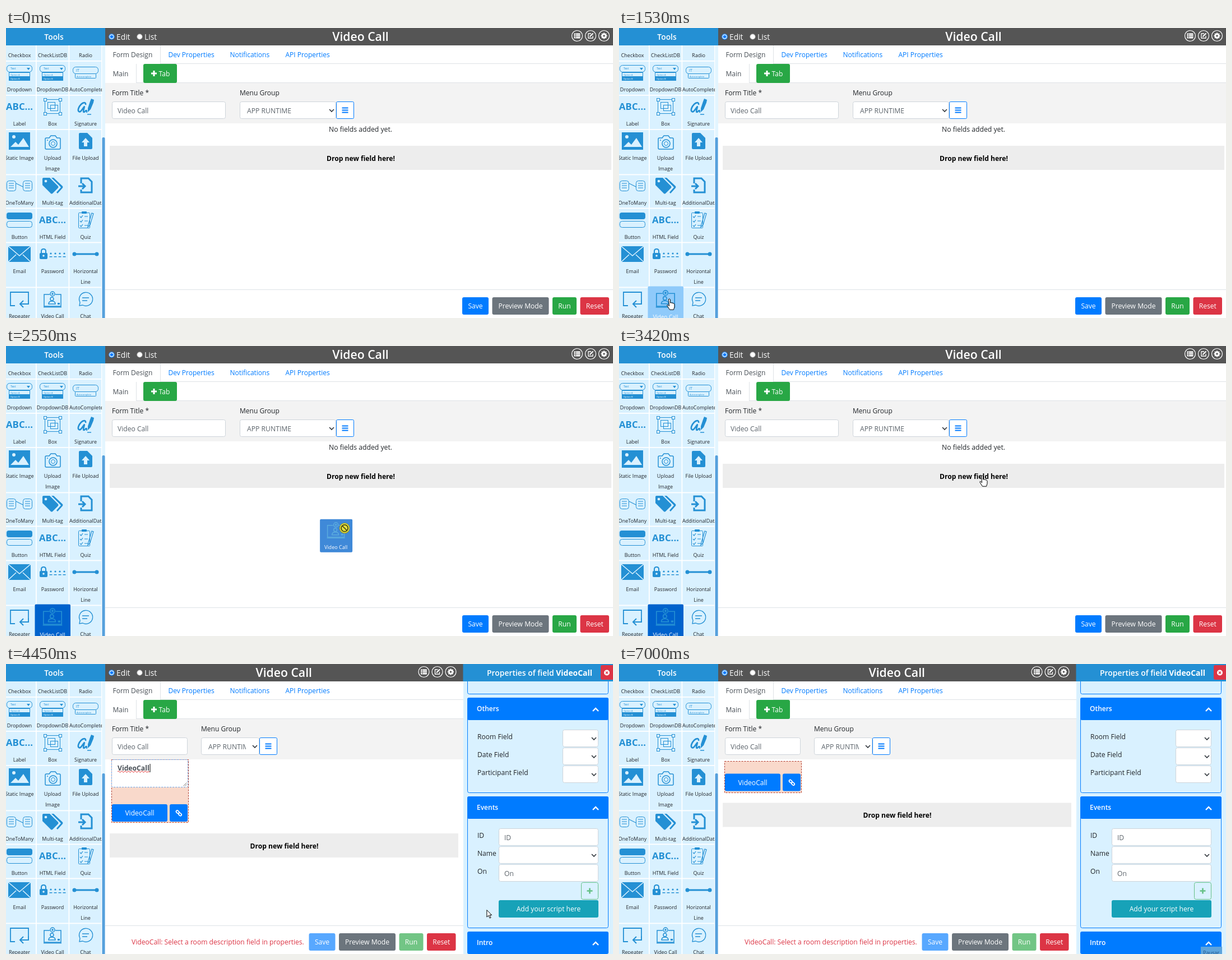
Write an HTML page that moves like this. It is 1083 px wide and 517 px high and loops after 7080 ms.

```html
<!DOCTYPE html>
<html lang="en">
<head>
<meta charset="utf-8">
<title>Form designer</title>
<style>
html, body { margin: 0; width: 100%; height: 100%; overflow: hidden; background: #fff; }
#stage { display: block; width: 100vw; height: 100vh; font-family: "Open Sans", "Noto Sans", sans-serif; }
</style>
</head>
<body>
<svg id="stage" viewBox="0 0 1083 517"></svg>
<script>
const BLUE = '#2490d4', PALE = '#d9f1ff', LINK = '#007bff', INK = '#212529', GREY = '#495057', SOFT = '#5c646b', EDGE = '#ced4da', RULE = '#dee2e6';

// Drawing helpers, each returning SVG markup
const text = (x, y, s, fill = INK, size = 12.1, anchor = 'start', weight = 400) =>
  `<text x="${x}" y="${y}" fill="${fill}" font-size="${size}" text-anchor="${anchor}" font-weight="${weight}">${s}</text>`;
const mid = (x, y, s, fill, size, weight) => text(x, y, s, fill, size, 'middle', weight);
const rect = (x, y, w, h, fill, r = 0, stroke = '', extra = '') => stroke
  ? `<rect x="${x + .5}" y="${y + .5}" width="${w - 1}" height="${h - 1}" rx="${r}" fill="${fill}" stroke="${stroke}" ${extra}/>`
  : `<rect x="${x}" y="${y}" width="${w}" height="${h}" rx="${r}" fill="${fill}" ${extra}/>`;
const fill = (d, c = BLUE) => `<path d="${d}" fill="${c}"/>`;
const line = (d, c = BLUE, w = 1.5) => `<path d="${d}" fill="none" stroke="${c}" stroke-width="${w}"/>`;
const dot = (x, y, r, c = BLUE) => `<circle cx="${x}" cy="${y}" r="${r}" fill="${c}"/>`;
const ring = (x, y, r, c = BLUE, w = 1.5) => `<circle cx="${x}" cy="${y}" r="${r}" fill="none" stroke="${c}" stroke-width="${w}"/>`;
const at = (x, y, s, k = 1) => `<g transform="translate(${x} ${y}) scale(${k})">${s}</g>`;
const group = (id, s) => `<g id="${id}">${s}</g>`;
const clip = (x, y, w, h, s) => `<svg x="${x}" y="${y}" width="${w}" height="${h}" viewBox="${x} ${y} ${w} ${h}">${s}</svg>`;

const button = (x, y, w, s, c, alpha = 1) =>
  `<g opacity="${alpha}">${rect(x, y, w, 31, c, 3)}${mid(x + w / 2, y + 20, s, '#fff')}</g>`;
const input = (x, y, w, s) => rect(x, y, w, 31, '#fff', 3, EDGE) + text(x + 10, y + 21, s, SOFT);
const select = (x, y, w, s = '') => rect(x, y, w, 31, '#fff', 3, EDGE) +
  clip(x + 1, y + 1, w - 25, 29, text(x + 13, y + 21, s, SOFT, 12.2)) +
  line(`M${x + w - 12} ${y + 14}l4 4 4-4`, '#343a40', 1.7);

// Tool icons, drawn around their own centre
const listIcon = rect(-23, -13, 46, 13, 'none', 5, BLUE) + text(-16, -5, 'Text', BLUE, 5) + fill('M13-8h6l-3 4z') +
  rect(-19, 0, 38, 8, 'none', 0, BLUE) + text(-16, 5.5, 'Option A', BLUE, 4) +
  rect(-19, 7, 38, 8, BLUE) + text(-16, 12.5, 'Option B', '#fff', 4);
const abc = mid(0, 6, 'ABC...', BLUE, 16.8, 700);
const boxHandles = [[-16, -15], [11, -15], [-16, 10], [11, 10]].map(([x, y]) => rect(x, y, 6, 6, PALE, 0, BLUE)).join('');
const card = x => rect(x, -9, 17, 19, 'none', 4, BLUE) + line(`M${x + 4}-4h9m-9 4h9m-9 4h9`, BLUE, 1);
const callIcon = line('M-5-9h-10v21h30v-21h-10') + ring(0, -10, 4) + dot(0, -10, 1.8) +
  ring(-1, -1, 3) + line('M-7 8q0-5 6-5t6 5z') + rect(9, 6, 4, 3, BLUE) + line('M-16 13.5h32');

const tools = [
  [48, 0, ['Checkbox'], '', ['CheckListDB'], '', ['Radio'], ''],
  [109, 79, ['Dropdown'], listIcon, ['DropdownDB'], listIcon, ['AutoComplete'],
    rect(-23, -10, 46, 13, 'none', 5, BLUE) + text(-17, -1, 'IT', BLUE, 7) + rect(-19, 2, 38, 9, 'none', 1, BLUE) + text(-16, 8.5, 'Autocomplete', BLUE, 4)],
  [170, 140, ['Label'], abc, ['Box'],
    rect(-14, -13, 28, 26, 'none', 0, BLUE) + boxHandles + rect(-9, -8, 14, 12, 'none', 0, BLUE) + rect(-4, -3, 14, 11, 'none', 0, BLUE),
    ['Signature'],
    line('M0-3c1-5-4-5-8-1s-7 11-4 13 6-4 9-8-3 9 0 9 2-3 4-3 0 3 2 3', BLUE, 2.6) + fill('M10-14l5 2-1 5-5 12-5 5 0-7 4-12z') + line('M3 14h7', BLUE, 1.5)],
  [231, 202, ['Static Image'], rect(-19, -16, 38, 31, BLUE) + dot(-10, -8, 3, PALE) + fill('M-16 10l9-9 5 5 9-12 10 16z', PALE),
    ['Upload', 'Image'], line('M-13-4q0-2 2-2h5l3-4h8l3 4h4q2 0 2 2v16q0 2-2 2h-23q-2 0-2-2z') + ring(1, 4, 7) + ring(1, 4, 3.5, BLUE, 1) + dot(-9, -2, 1),
    ['File Upload'], fill('M-10-15h13l9 9v18q0 2-2 2h-20q-2 0-2-2v-25q0-2 2-2z') + fill('M0-6l7 8h-4v7h-6v-7h-4z', PALE)],
  [311, 281, ['OneToMany'], card(-23) + card(6) + line('M-6-4l12 6', BLUE, 1.2),
    ['Multi-tag'], fill('M-2-14h4l16 15q1 2 0 3l-9 10-2-2 8-9z') + fill('M-18-12q0-2 2-2h11l15 15q1 2 0 3l-10 10q-2 1-3 0l-15-15z') + dot(-12, -8, 2.3, PALE),
    ['AdditionalData'], line('M-8-4v-9h13l6 6v19h-19v-5', BLUE, 3) + line('M-13 1h12m-5-5l5 5-5 5', BLUE, 3)],
  [372, 342, ['Button'], rect(-23, -13, 46, 12, BLUE, 4) + rect(-23, 2, 46, 12, 'none', 4, BLUE),
    ['HTML Field'], abc, ['Quiz'],
    rect(-13, -13, 21, 28, 'none', 1, BLUE) + rect(-7, -15, 9, 4, BLUE, 1) +
    [-6, 2, 10].map(y => line(`M-10 ${y}l2 2 3-4m3 2h6`, BLUE, 1.2)).join('') + line('M11-12l-6 20-1 5 4-4 6-20z', BLUE, 1.2)],
  [433, 403, ['Email'], rect(-20, -14, 40, 28, BLUE) + line('M-20-14l20 17 20-17M-20 14l14-13M20 14l-14-13', PALE, 1.6),
    ['Password'], rect(-23, -2, 14, 11, BLUE, 2) + line('M-20-2v-3q0-4 4-4t4 4v3', BLUE, 2) + dot(-16, 3, 1.8, PALE) +
    [-3, 5, 13, 21].map(x => dot(x, -1, 1.6) + rect(x - 2.5, 4, 5, 1.5, BLUE)).join(''),
    ['Horizontal', 'Line'], line('M-20 0h40', BLUE, 3) + dot(-20, 0, 3.5) + dot(20, 0, 3.5)],
  [513, 484, ['Repeater'], line('M-8 11h-8v-24h32v14', BLUE, 1.8) + line('M16 1v7h-15m6-6l-6 6 6 6', BLUE, 2),
    ['Video Call'], callIcon, ['Chat'],
    line('M-11 11l1-6a12 12 0 1 1 5 5z', BLUE, 1.4) + line('M-6-3h12m-12 5h9', BLUE, 1.4)]
];

function sidebar() {
  let s = rect(0, 30, 177, 487, PALE);
  for (const y of [58, 119, 180, 260.5, 320.5, 381.5, 461.5]) s += rect(0, y, 171, 1.8, '#fff');
  for (const x of [53, 111.5, 170]) s += rect(x, 30, 1.8, 487, '#fff');
  for (const [labelY, iconY, ...cells] of tools)
    for (let i = 0; i < 3; i++) {
      const x = 24 + 59 * i;
      s += at(x, iconY, cells[2 * i + 1]);
      cells[2 * i].forEach((word, n) => {
        const y = labelY + 3.5 + 19.3 * n, wide = i === 2 && word.length > 11;
        s += wide ? text(113, y, word, INK, 9) : mid(x, y, word, INK, 9);
      });
    }
  return clip(0, 30, 171.5, 487, s) + rect(171.5, 30, 5.5, 487, '#e3f5ff') + rect(171.5, 195, 5, 324, '#56a0dc', 2) +
    rect(0, 0, 177, 31, BLUE) + mid(85.5, 20.5, 'Tools', '#fff', 13.8, 600);
}

// Main area; "cut" is the width taken by the properties panel
function main(cut) {
  const r = x => x - cut, alpha = cut ? .65 : 1;
  const col = (x, n) => Math.floor(x - cut * n / 4);
  const sx = col(417, 1), bx = col(589, 2);
  const badge = (x, s) => at(r(x), 14, ring(0, 0, 9.5, '#fff', 1.2) + s);
  const gear = [0, 45, 90, 135].map(a => `<path d="M-5.5 0h11" stroke="#fff" stroke-width="2.4" transform="rotate(${a})"/>`).join('');
  return rect(177, 0, 906, 517, '#fff') + rect(177, 0, 906, 31, '#555') +
    dot(188.5, 15.5, 5, '#fff') + ring(188.5, 15.5, 4.6, LINK, 1.2) + dot(188.5, 15.5, 2.8, LINK) + text(197, 20.5, 'Edit', '#fff', 13.8) +
    dot(238.5, 15.5, 5, '#fff') + ring(238.5, 15.5, 4.8, '#767676', .8) + text(247, 20.5, 'List', '#fff', 13.8) +
    mid(632.5 - cut / 2, 23, 'Video Call', '#fff', 21.2, 600) +
    badge(1019, rect(-5.5, -4.5, 11, 9, '#fff', 1) + line('M-2.5-4.5v9M-5.5-1.5h11m-11 3h11', '#555', .8)) +
    badge(1043, line('M1-4h-5v8h8v-4', '#fff', 1.3) + line('M-1.5 1.5l6-6', '#fff', 2.2)) +
    badge(1067, gear + dot(0, 0, 4.2, '#fff') + dot(0, 0, 1.7, '#555')) +
    rect(177, 63, 906, 1, RULE) + rect(177, 63, 98, 1, '#fff') + rect(275, 31, 1, 33, RULE) +
    text(190.5, 52, 'Form Design', GREY, 12) + text(289.5, 52, 'Dev Properties', LINK, 12) +
    text(399.5, 52, 'Notifications', LINK, 12) + text(498.5, 52, 'API Properties', LINK, 12) +
    rect(177, 97, 906, 1, RULE) + rect(177, 97, 55, 1, '#fff') + rect(232, 64, 1, 34, RULE) + text(190.5, 86, 'Main', GREY, 12) +
    rect(245, 64, 60, 34, '#28a745', 3) + line('M259 81h10m-5-5v10', '#fff', 3) + text(272.5, 86, 'Tab', '#fff') +
    rect(177, 98, 906, 72, '#f3f3f3') +
    text(189, 120, 'Form Title *', INK, 12) + input(189, 131, col(203.5, 1), 'Video Call') +
    text(sx, 120, 'Menu Group', INK, 12) + select(sx, 131, bx - sx, 'APP RUNTIME') +
    rect(bx, 131, 32, 31, '#fff', 2, LINK) + line(`M${bx + 10.5} 142.5h11m-11 4h11m-11 4h11`, LINK, 1.8) +
    rect(177, 466, 906, 1, RULE) +
    button(r(814), 480, 47, 'Save', LINK, alpha) + button(r(867.5), 480, 101, 'Preview Mode', '#6c757d') +
    button(r(975), 480, 43, 'Run', '#28a745', alpha) + button(r(1024.5), 480, 51.5, 'Reset', '#dc3545');
}

const dropBar = (y, w) => rect(185, y, w, 43, '#ededed') + mid(185.5 + w / 2, y + 26.5, 'Drop new field here!', '#000', 12.1, 700);

function panel() {
  const head = (y, s) => rect(823, y, 252, 40, LINK, 3) + text(840, y + 23.5, s, '#fff', 12, 'start', 600) + line(`M1047 ${y + 24}l5-5 5 5`, '#fff', 2.4);
  const body = (y, h) => rect(823, y, 252, h, PALE, 3, LINK);
  let s = rect(816, 0, 267, 517, PALE) + rect(815.5, 0, 267.5, 31, BLUE) +
    mid(952, 20.5, 'Properties of field <tspan font-weight="700">VideoCall</tspan>', '#fff', 13.9, 600) +
    rect(1061, 2, 24, 26, '#dc3545', 3) + dot(1072, 15.5, 5, '#fff') + line('M1070 13.5l4 4m0-4l-4 4', '#dc3545', 1.4) +
    clip(816, 31, 267, 30, body(10, 44)) +
    body(60, 170) + head(60, 'Others') + body(236, 235) + head(236, 'Events') + head(477, 'Intro');
  ['Room Field', 'Date Field', 'Participant Field'].forEach((w, i) => s += text(841, 134 + 32 * i, w) + select(993, 117 + 32 * i, 64));
  ['ID', 'Name', 'On'].forEach((w, i) => s += text(841, 309.5 + 32 * i, w) +
    (i === 1 ? select(879, 325, 178) : input(879, 293 + 32 * i, 178, w)));
  return s + `<g opacity=".65">${rect(1026, 389, 31, 31, 'none', 3, '#28a745')}${line('M1036.5 404.5h10m-5-5v10', '#28a745', 2.6)}</g>` +
    button(879, 421, 178, 'Add your script here', '#17a2b8');
}

const frame = (y, h) => rect(188, y, 138, h, '#f9d9cb', 0, '#b0392b', 'stroke-dasharray="3 2"');
const chain = at(308, 265.5, `<g transform="rotate(45)">${[-6, 0].map(x => rect(x, -2.5, 7, 5, 'none', 2.2, '#fff', 'stroke-width="1.7"')).join('')}</g>`);
const wave = 'M199 192' + 'q1.5-2.5 3 0t3 0'.repeat(9) + 'h3';
const editor = frame(170, 113) + rect(188, 170, 137, 50, '#fff', 2, '#6fa8e8', 'stroke-dasharray="3 2"') +
  text(199, 190, 'VideoCall', GREY, 12.2, 'start', 700) + line(wave, '#e03030', 1) + rect(256.5, 178, 1, 15, '#000') +
  line('M316.5 217.5l6-6m-3 6l3-3', '#777', 1);
const fieldButtons = rect(189, 250, 99, 31, LINK, 3) + mid(238.5, 270, 'VideoCall', '#fff') + rect(292, 250, 32, 31, LINK, 3) + chain + dropBar(302, 622);

const liveTile = c => rect(51.5, 460.5, 63.5, 58, c, 2) + at(83, 483, callIcon, 1.08) + mid(83, 519, 'Video Call', '#fff', 9.9);
const ghost = `<g opacity=".75">${rect(0, 0, 58, 59, '#0062cc', 2)}${at(28.5, 20, callIcon)}${mid(28.5, 53, 'Video Call', '#fff', 9)}</g>`;
const shape = d => `<path d="${d}" fill="#fff" stroke="#000"/>`;

document.getElementById('stage').innerHTML =
  group('before', main(0) + mid(632.5, 184.5, 'No fields added yet.', INK, 12.2) + dropBar(210, 895)) +
  group('after', main(273.5) + text(224, 500, 'VideoCall: Select a room description field in properties.', '#dc3545') +
    group('editor', editor) + group('plain', frame(173, 57)) + group('field', fieldButtons) + panel()) +
  sidebar() + group('hover', liveTile('#8fcafa')) + group('active', liveTile('#0062cc')) +
  group('tip', `<rect id="tipBox" y="504" height="14" fill="#5ea4dc"/>` + group('tipText', text(1042, 517.5, 'Pausar', '#1c4f86', 9))) +
  group('ghost', ghost) +
  group('nodrop', dot(0, 0, 9.5, '#8f9130') + dot(0, 0, 8.5, '#e3df3c') + ring(0, 0, 6, '#3c3c14', 1.6) + line('M-4-4l8 8', '#3c3c14', 1.6)) +
  group('hand', shape('M-1.5.5q1.5-1.5 3 .5v6l1.5-.3 2 .5 1.5.5 1.5.5 1 1.5v4.5l-1.5 5h-7l-4.5-7q-.5-2.5 1.5-1.5l2 2z')) +
  group('arrow', shape('M.5.5v12.5l3-2.8 2.2 4.8 2-1-2.2-4.5h3.8z'));

// Pointer path: time, x, y
const path = [
  [400, 963, 506], [530, 860, 468], [700, 640, 440], [880, 400, 446], [1060, 199, 478], [1130, 165, 484], [1260, 110, 486],
  [1530, 90, 483], [1800, 95, 484], [1880, 130, 480], [2150, 299, 447], [2400, 519, 367], [2550, 599, 331], [2800, 629, 284],
  [3100, 646, 242], [3290, 648, 231], [3620, 648, 231], [3800, 672, 265], [4260, 791, 401], [4450, 857, 438], [4700, 950, 462],
  [5000, 1066, 503], [5060, 1066, 511], [5130, 1066, 516]
];
function pointer(t) {
  const next = path.findIndex(p => p[0] > t), i = next < 0 ? path.length - 1 : Math.max(1, next);
  const [a, b] = [path[i - 1], path[i]], k = (t - a[0]) / (b[0] - a[0]);
  return [a[1] + (b[1] - a[1]) * k, a[2] + (b[2] - a[2]) * k];
}

const el = id => document.getElementById(id);
const show = (id, on) => el(id).style.display = on ? '' : 'none';
const place = (id, x, y) => el(id).setAttribute('transform', `translate(${x.toFixed(1)} ${y.toFixed(1)})`);
const LOOP = 7080, PRESS = 1660, DRAG = 1880, DROP = 3420, OPEN = 3620, BLUR = 6930;

function draw(t) {
  const [x, y] = pointer(t);
  const seen = t >= 400 && t < 5130, dragging = t >= DRAG && t < DROP, blurred = t >= BLUR;
  const onTile = t < DRAG && x < 115, barred = dragging && y > 253;
  const pointing = onTile || (t >= DROP && t < OPEN);

  show('before', t < OPEN);
  show('after', t >= OPEN);
  show('editor', !blurred);
  show('plain', blurred);
  place('field', 0, blurred ? -54.5 : 0);
  show('hover', seen && onTile && t < PRESS);
  show('active', t >= PRESS && t < OPEN);

  show('ghost', dragging);
  show('nodrop', barred);
  show('hand', seen && pointing);
  show('arrow', seen && !pointing && !barred);
  place('ghost', x - 39, y - 22);
  place('nodrop', x + 5, y - 6);
  place('hand', x, y);
  place('arrow', x, y);

  const k = Math.min(1, Math.max(0, (t - 6190) / 410));
  show('tip', t >= 6190);
  el('tip').setAttribute('opacity', .2 + .8 * k);
  el('tipBox').setAttribute('x', 1056 - 18 * k);
  el('tipBox').setAttribute('width', 27 + 11 * k);
  el('tipText').setAttribute('opacity', k);
}

const start = performance.now();
function tick() {
  draw((performance.now() - start) % LOOP);
  requestAnimationFrame(tick);
}
tick();
</script>
</body>
</html>
```
